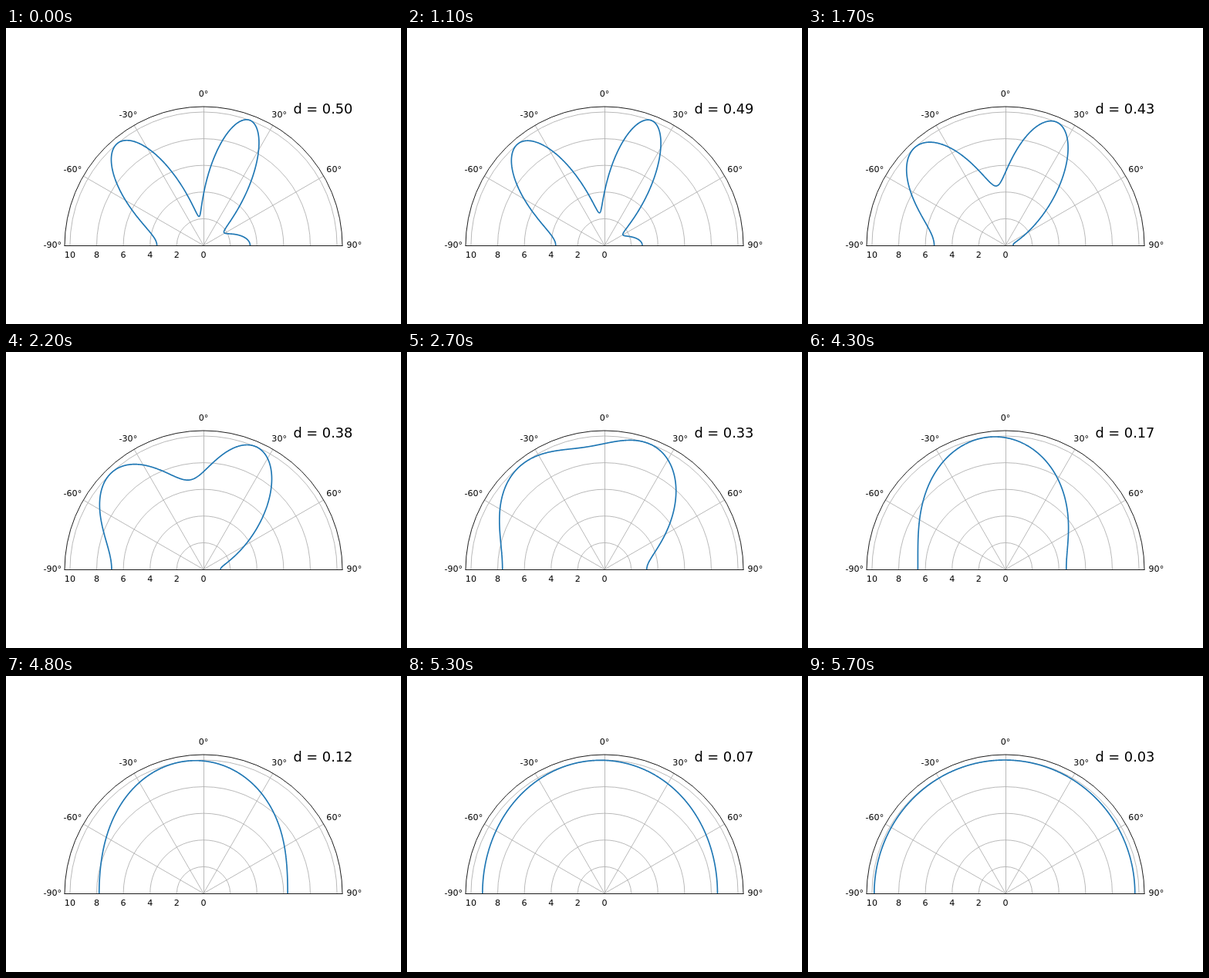
An HTML page for the animation above (5800 ms loop, 512 by 384 pixels).

```html
<!DOCTYPE html>
<html lang="en">
<head>
<meta charset="utf-8">
<title>Beam pattern against element spacing</title>
<style>
  html, body { margin: 0; width: 100%; height: 100%; overflow: hidden; background: #fff; }
  svg { display: block; font: 11.11px "DejaVu Sans", sans-serif; }
  path { fill: none; stroke-width: .889; }
  .label { text-anchor: middle; }
</style>
</head>
<body>
<svg width="512" height="384" viewBox="0 0 512 384">
  <clipPath id="half"><path d="M76 282A180 180 0 0 1 436 282Z"/></clipPath>
  <path id="grid" stroke="#b0b0b0"/>
  <path id="beam" stroke="#1f77b4" style="stroke-width:1.667" stroke-linejoin="round" stroke-linecap="square" clip-path="url(#half)"/>
  <path stroke="#000" stroke-linecap="square" d="M76 282A180 180 0 0 1 436 282M76 282.5H436"/>
  <g id="labels"></g>
  <text id="spacing" x="372.4" y="111" font-size="17.78"></text>
</svg>
<script>
const CX = 256, CY = 282, R = 180, UNIT = R / 10.4;
const LOOP = 5800, HOLD = 1000, STEP = 100;
const POINTS = 1000, ELEMENTS = 3;
const rad = deg => deg * Math.PI / 180;
const sources = [20, -40].map(deg => Math.sin(rad(deg)));
const el = id => document.getElementById(id);

const polar = (angle, r) =>
  (CX + r * Math.sin(angle)).toFixed(2) + ' ' + (CY - r * Math.cos(angle)).toFixed(2);

function drawGrid() {
  let d = `M256.5 ${CY}V${CY - R}`;
  for (const deg of [-60, -30, 30, 60]) d += `M${CX} ${CY}L${polar(rad(deg), R)}`;
  for (let v = 2; v <= 10; v += 2) {
    const r = v * UNIT;
    d += `M${CX - r} ${CY}A${r} ${r} 0 0 1 ${CX + r} ${CY}`;
  }
  el('grid').setAttribute('d', d);
}

function drawLabels() {
  const labels = [
    ['-90°', 60.3, 285], ['-60°', 86.4, 187], ['-30°', 158.4, 116], ['0°', 256, 89],
    ['30°', 354.2, 116], ['60°', 425.2, 187], ['90°', 451.4, 285]
  ];
  for (let v = 0; v <= 10; v += 2) labels.push([v, CX - v * UNIT, 298]);
  el('labels').innerHTML = labels
    .map(([text, x, y]) => `<text class="label" x="${x}" y="${y}">${text}</text>`).join('');
}

// Power of a uniform array steered to u, for equal uncorrelated sources.
function power(u, d) {
  return sources.reduce((sum, s) => {
    const half = Math.PI * d * (u - s);
    const gain = Math.abs(half) < 1e-9 ? ELEMENTS : Math.sin(ELEMENTS * half) / Math.sin(half);
    return sum + gain * gain;
  }, 0);
}

function drawBeam(d) {
  const angles = Array.from({ length: POINTS }, (_, i) => Math.PI * (i / (POINTS - 1) - .5));
  const values = angles.map(a => power(Math.sin(a), d));
  const scale = 10 * UNIT / Math.max(...values);
  el('beam').setAttribute('d', 'M' + angles.map((a, i) => polar(a, values[i] * scale)).join('L'));
  el('spacing').textContent = 'd = ' + d.toFixed(2);
}

let shown = -1;
const start = performance.now();
function frame(now) {
  const t = Math.max(0, now - start) % LOOP;
  const step = Math.max(0, Math.floor((t - HOLD) / STEP));
  if (step !== shown) drawBeam((50 - step) / 100);
  shown = step;
  requestAnimationFrame(frame);
}

drawGrid();
drawLabels();
frame(start);
</script>
</body>
</html>
```
